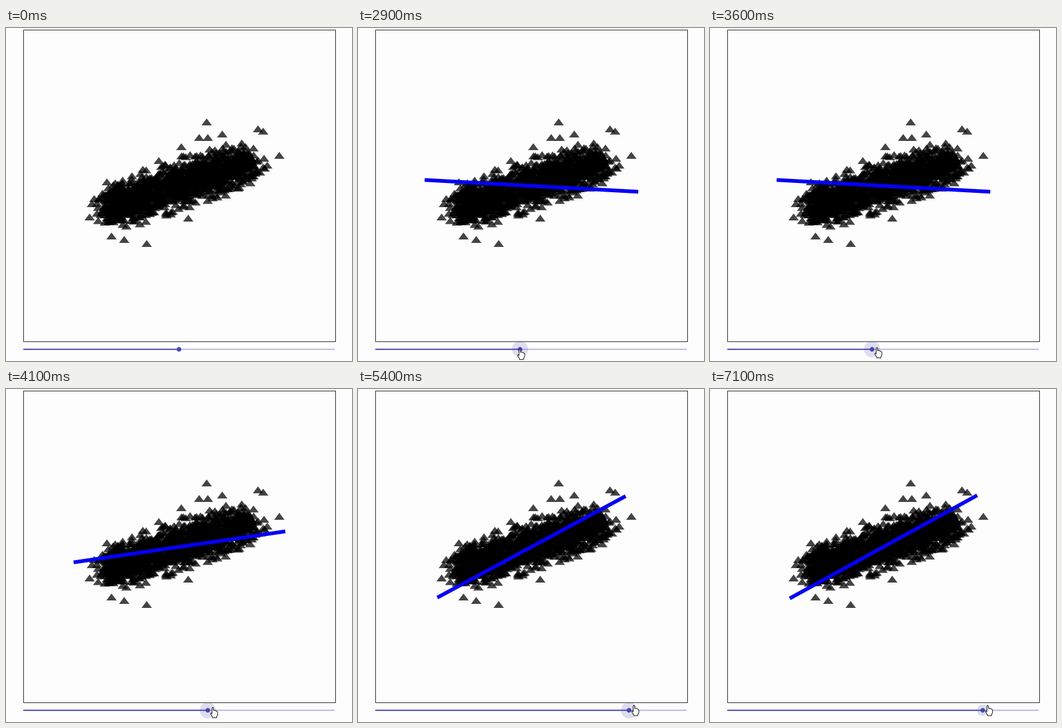
Write a matplotlib script that moves like this. It is 600x578 px and loops after 7.2 s.

```python
import numpy as np
import matplotlib.pyplot as plt
from matplotlib.animation import FuncAnimation
from matplotlib.collections import PolyCollection
from matplotlib.patches import Circle, Polygon, Rectangle

W, H, DPI = 600, 578, 100
STEP, FRAMES = 100, 72
PX = 72 / DPI
PAPER, INDIGO, RAIL, LINE = "#fefdfe", "#4846b2", "#b7b4df", "#0500f3"
TRACK_Y, REST = 557.7, 300
PIVOT, HALF = np.array([300.8, 274]), 185.5

# The clearest outliers of the cloud
STRAYS = [(348, 163), (437, 175), (446, 179), (375, 184), (335, 190), (350, 190),
          (304, 206), (474, 221), (453, 238), (265, 230), (175, 267), (153, 296),
          (145, 328), (183, 361), (205, 367), (244, 374), (316, 330)]

# Turning points of the drag: time in ms, thumb x
DRAG_T = [2500, 2900, 3300, 3600, 4600, 5400, 5900, 6400]
DRAG_X = [REST, 281, 228, 281, 419, 470, 489, 473]

HAND = np.array([
    (-3.8, -8), (-2.5, -9), (-1.2, -8), (-1.2, -3.6), (1, -3.8), (3.5, -2.8),
    (5.4, -1.6), (6, 0), (6, 4), (4.2, 7), (4.2, 9), (-3, 9), (-3, 7.5),
    (-6, 2.6), (-6, 1), (-4.8, 0.8), (-3.8, 2.2)])
ARROW = np.array([(-6, -9.5), (-6, 6), (-2.5, 3), (0, 9), (2.3, 8), (-0.2, 2.2), (5, 2.2)])


def ramp(t, start, end):
    return np.clip((t - start) / (end - start), 0, 1)


def ease_out(s):
    return 1 - (1 - s) ** 2


def cloud(count=1150, tilt=np.radians(18.5)):
    """Seeded points along a tilted band with rounded ends."""
    rng = np.random.default_rng(7)
    along = rng.uniform(-137, 137, count) + rng.normal(0, 8, count)
    across = rng.normal(0, 20, count)
    keep = np.abs(along / 156) ** 3 + np.abs(across / 46) ** 3 < 1
    along, across = along[keep], across[keep]
    x = 299 + along * np.cos(tilt) + across * np.sin(tilt)
    y = 272 - along * np.sin(tilt) + across * np.cos(tilt)
    return np.vstack([np.column_stack([x, y]), STRAYS])


def thumb_x(t):
    return np.interp(t, DRAG_T, DRAG_X)


def halo_radius(t):
    return 9 * ramp(t, 1700, 1900) + 5 * ramp(t, 2400, 2600) - 4 * ramp(t, 6800, 7100)


def pointer(t):
    """Sweeps in from the right, settles on the thumb, then drags it."""
    sweep, settle = ramp(t, 1000, 1500), ease_out(ramp(t, 1500, 1900))
    if t < 2500:
        return 582 - 309 * sweep + 29 * settle, 354 + 214 * ease_out(sweep)
    return thumb_x(t) + 2 + 9 * ramp(t, 3200, 3600), 568 - 10 * ramp(t, 2500, 5000)


fig = plt.figure(figsize=(W / DPI, H / DPI), dpi=DPI, facecolor=PAPER)
ax = fig.add_axes([0, 0, 1, 1])
ax.set(xlim=(0, W), ylim=(H, 0))
ax.axis("off")


def stroke(color, width, zorder):
    return ax.plot([], [], color=color, lw=width * PX, solid_capstyle="butt",
                   snap=False, zorder=zorder)[0]


ax.add_patch(Rectangle((30.5, 3.5), 541, 541, fill=False, ec="#1a1a1a", lw=PX, snap=False))
triangle = np.array([(-9, 6), (0, -6), (9, 6)])
ax.add_collection(PolyCollection(
    cloud()[:, None, :] + triangle, facecolors=(0, 0, 0, 0.73), edgecolors="none", zorder=2))

bar = stroke(LINE, 6.5, 3)
rail = stroke(RAIL, 2, 4)
rail.set_data([30, 570], [TRACK_Y] * 2)
track = stroke(INDIGO, 2, 5)
halo = Circle((REST, TRACK_Y), 0, fc="#4a4fae", ec="none", alpha=0.18, zorder=6)
thumb = Circle((REST, TRACK_Y), 4, fc=INDIGO, ec="none", zorder=7)
cursor = Polygon(HAND, closed=True, fc="white", ec="black", lw=PX, zorder=8)
for patch in (halo, thumb, cursor):
    ax.add_patch(patch)


def draw(frame):
    t = frame * STEP
    x = thumb_x(t)
    track.set_data([30, x], [TRACK_Y] * 2)
    thumb.center = halo.center = (x, TRACK_Y)
    halo.set_radius(halo_radius(t))

    # The slider spans 90 degrees over its 540 px
    angle = np.radians((x - REST) / 6)
    arm = HALF * np.array([np.cos(angle), -np.sin(angle)])
    bar.set_data(*np.transpose([PIVOT - arm, PIVOT + arm]))
    bar.set_visible(t >= DRAG_T[0])

    px, py = pointer(t)
    cursor.set_xy((HAND if py > 548 else ARROW) + (px, py))
    cursor.set_visible(t >= 1000)
    return bar, track, halo, thumb, cursor


anim = FuncAnimation(fig, draw, frames=FRAMES, interval=STEP, repeat=True, repeat_delay=0)
plt.show()
```
